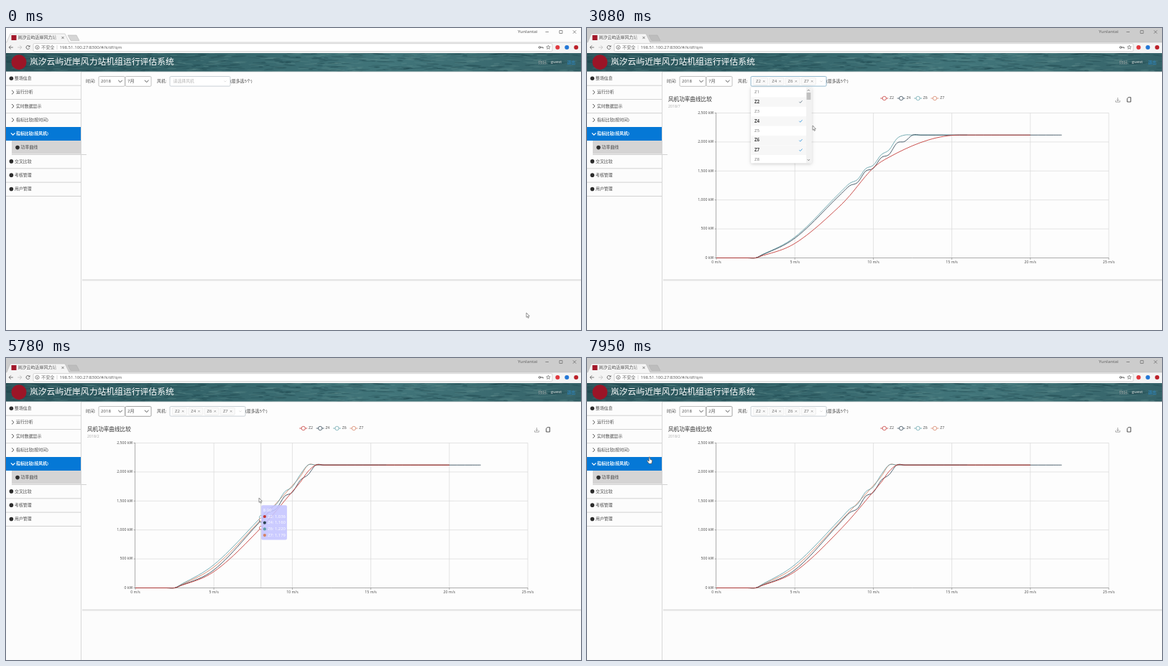
An HTML page with a canvas for the animation above (8 s loop, 800x421 px).

```html
<!DOCTYPE html>
<html lang="zh">
<head>
<meta charset="utf-8">
<title>风机功率曲线比较</title>
<style>
html, body { margin: 0; width: 100%; height: 100%; overflow: hidden; background: #fcfcfc; }
canvas { display: block; width: 800px; height: 421px; }
</style>
</head>
<body>
<canvas id="stage" width="800" height="421"></canvas>
<script>
const ctx = document.getElementById('stage').getContext('2d');
const LOOP = 8000;
const FONT = '"Open Sans", "Noto Sans CJK SC", "Noto Sans CJK", sans-serif';
const GRID = { l: 180, r: 726, t: 118.5, b: 320.5 };
const RATED = 2120, CUT_IN = 2.5;

// Each month: power in kW at 5, 8 and 10.5 m/s, then the speed of full power.
// pick: when it is chosen; last: top speed measured; dip: ripple at whole speeds.
const TURBINES = [
  { name: 'Z2', color: '#c23531', pick: 1880, last: 20, dip: 0,
    july: [250, 930, 1660, 15.5], feb: [280, 1036, 1821, 11.5] },
  { name: 'Z4', color: '#2f4554', pick: 2220, last: 22, dip: 70,
    july: [340, 1120, 1730, 12.5], feb: [310, 1160, 1856, 11.5] },
  { name: 'Z6', color: '#61a0a8', pick: 2520, last: 16, dip: 60,
    july: [360, 1160, 1780, 12], feb: [400, 1220, 1953, 11] },
  { name: 'Z7', color: '#d48265', pick: 2960, last: 20, dip: 0,
    july: [340, 1040, 1620, 12.5], feb: [360, 1179, 1920.5, 11] }
];

const OPEN = 1000, CLOSE = 3600, MONTH_OPEN = 4350, MONTH_PICK = 5030;
const DRAW_DELAY = 60, DRAW_TIME = 500;

// Pointer stops: arrival time, x, y
const STOPS = [
  [50, 724, 397], [900, 277, 74], [1880, 262, 98], [2080, 260, 124], [2520, 260, 152],
  [2960, 261, 166], [3080, 314, 136], [3600, 340, 106], [4120, 181, 75], [5030, 182, 91],
  [5780, 352, 195], [6650, 415, 190], [7200, 465, 215], [7740, 415, 195], [7930, 87, 138]
];

const clamp = (v, a = 0, b = 1) => Math.min(b, Math.max(a, v));
const lerp = (a, b, p) => a + (b - a) * p;
const easeOut = p => 1 - (1 - clamp(p)) ** 3;
const smooth = p => p * p * (3 - 2 * p);

function text(s, x, y, size, color = '#484848', align = 'left', weight = 400) {
  ctx.font = `${weight} ${size}px ${FONT}`;
  ctx.fillStyle = color;
  ctx.textAlign = align;
  ctx.textBaseline = 'middle';
  ctx.fillText(s, x, y);
}
function rect(x, y, w, h, color) {
  ctx.fillStyle = color;
  ctx.fillRect(x, y, w, h);
}
function paint(fill, stroke, width) {
  if (fill) { ctx.fillStyle = fill; ctx.fill(); }
  if (stroke) { ctx.strokeStyle = stroke; ctx.lineWidth = width; ctx.stroke(); }
}
function box(x, y, w, h, r, fill, stroke) {
  ctx.beginPath();
  ctx.roundRect(x, y, w, h, r);
  paint(fill, stroke, 0.8);
}
function disc(x, y, r, fill, stroke) {
  ctx.beginPath();
  ctx.arc(x, y, r, 0, 7);
  paint(fill, stroke, 0.75);
}
function line(points, color, width = 0.8) {
  ctx.beginPath();
  points.forEach(([x, y]) => ctx.lineTo(x, y));
  paint(null, color, width);
}
function shape(points, fill, stroke, width = 0.8) {
  ctx.beginPath();
  points.forEach(([x, y]) => ctx.lineTo(x, y));
  ctx.closePath();
  paint(fill, stroke, width);
}
const chevron = (x, y, color, s = 2.8, width = 1) =>
  line([[x - s, y - s / 2], [x, y + s / 2], [x + s, y - s / 2]], color, width);
const arrow = (x, y, s, color) => {
  line([[x - s * 2.8, y], [x + s * 2.8, y]], color);
  line([[x + s * 0.2, y - 2.6], [x + s * 2.8, y], [x + s * 0.2, y + 2.6]], color);
};
const tick = (x, y, color) =>
  line([[x - 2, y], [x - 0.6, y + 1.5], [x + 2.2, y - 1.6]], color, 0.9);
function cross(x, y, s, color) {
  line([[x - s, y - s], [x + s, y + s]], color, 0.65);
  line([[x + s, y - s], [x - s, y + s]], color, 0.65);
}

function pointerAt(t) {
  const next = STOPS.findIndex(s => s[0] > t);
  if (next < 1) return STOPS.at(next).slice(1);
  const [t0, x0, y0] = STOPS[next - 1], [t1, x1, y1] = STOPS[next];
  const p = smooth((t - t0) / (t1 - t0));
  return [lerp(x0, x1, p), lerp(y0, y1, p)];
}

// Soft water band behind the page title, painted once
const sea = document.createElement('canvas');
sea.width = 800;
sea.height = 26;
(function paintSea() {
  const c = sea.getContext('2d');
  const g = c.createLinearGradient(0, 0, 800, 8);
  ['#2a5359', '#34646a', '#41757a', '#356268'].forEach((color, i) => g.addColorStop(i / 3, color));
  c.fillStyle = g;
  c.fillRect(0, 0, 800, 26);
  let seed = 11;
  const rnd = () => (seed = seed * 16807 % 2147483647) / 2147483647;
  for (let i = 0; i < 500; i++) {
    c.fillStyle = i % 2 ? 'rgba(120,164,162,.2)' : 'rgba(14,48,56,.24)';
    c.beginPath();
    c.ellipse(rnd() * 800, rnd() * 26, 3 + rnd() * 10, 0.4 + rnd() * 0.7, rnd() * 0.2 - 0.1, 0, 7);
    c.fill();
  }
})();

function browserBar(focused) {
  rect(0, 0, 800, 20, focused ? '#cccccc' : '#fdfdfd');
  shape([[86, 10], [98, 10], [102, 17.5], [90, 17.5]], focused ? '#bdbdbd' : '#d6d6d6', '#aaa', 0.5);
  rect(0, 20, 800, 15, '#f4f4f4');
  shape([[1, 20.5], [6, 8], [82, 8], [88, 20.5]], '#f4f4f4');
  line([[0, 20], [1, 20], [6, 8], [82, 8], [88, 20], [800, 20]], '#b9b9b9', 0.6);
  rect(7.5, 10, 7, 7, '#a3182a');
  const fade = ctx.createLinearGradient(62, 0, 75, 0);
  fade.addColorStop(0, '#444');
  fade.addColorStop(1, 'rgba(68,68,68,0)');
  text('岚汐云屿近岸风力站', 16.5, 13.7, 6, fade);
  cross(79, 13.5, 1.6, '#444');
  text('Yunlantai', 712, 5.6, 6, '#777', 'left', 600);
  line([[750.5, 5.5], [755, 5.5]], '#666', 0.7);
  box(770, 3.5, 4, 4, 0, null, '#777');
  cross(791, 5.5, 2.2, '#555');

  arrow(7, 27, -1, '#555');
  arrow(19, 27, 1, '#bbb');
  ctx.beginPath();
  ctx.arc(30.5, 27, 2.5, 0.4, 5.6);
  paint(null, '#555', 0.8);
  shape([[33.4, 24], [33.4, 26.6], [30.8, 26.6]], '#555');
  box(38, 21.7, 722, 11, 1.5, '#fff', '#ccc');
  disc(43.5, 27, 2.6, null, '#666');
  line([[43.5, 26], [43.5, 28.6]], '#666');
  text('不安全', 49, 27.2, 6.2, '#666');
  line([[71, 24], [71, 30]], '#bbb', 0.6);
  text('198.51.100.27:8300/#/k/df/qm', 74.5, 27, 6.1, '#555');
  disc(742.5, 27, 1.3, null, '#333');
  line([[743.8, 27], [747.2, 27], [747.2, 28.4]], '#333');
  shape(Array.from({ length: 10 }, (_, i) => {
    const a = i * Math.PI / 5 - Math.PI / 2, r = i % 2 ? 1.3 : 2.9;
    return [754.5 + r * Math.cos(a), 27 + r * Math.sin(a)];
  }), null, '#555', 0.6);
  ['#e0383e', '#2377d6', '#bb2028'].forEach((color, i) => disc(767.4 + i * 12.9, 27, 3, color));
}

function header() {
  ctx.drawImage(sea, 0, 35);
  rect(0, 60.5, 800, 0.8, '#b8c2c4');
  disc(18, 47.7, 10.5, '#9c1527');
  text('岚汐云屿近岸风力站机组运行评估系统', 33, 48, 11.82, '#fff', 'left', 500);
  text('你好,', 740.5, 48, 5.8, '#a3a9a8');
  text('guest', 758, 47.8, 5.8, '#b9c3c3', 'left', 600);
  text('退出', 780.5, 48, 5.8, '#2a8fd8');
}

function sidebar() {
  const items = ['整场信息', '>运行分析', '>实时数据显示', '>指标比较(按时间)', '指标比较(按风机)',
    '功率曲线', '交叉比较', '考核管理', '用户管理'];
  const row = 19.28, active = 4, sub = 5;
  rect(0, 61, 104, 360, '#fcfcfc');
  items.forEach((s, i) => {
    const y = 70.5 + i * row, group = s[0] === '>';
    if (i === active) {
      rect(0, 138, 104.5, 19, '#0578d6');
      chevron(9.7, 147.8, '#fff', 2.8, 1.2);
      text(s, 14, y + 0.3, 5.9, '#fff', 'left', 600);
      return;
    }
    const indent = i === sub ? 8.6 : 0;
    if (indent) rect(8, 157, 96.5, 18.5, '#d5d4d4');
    if (i !== active - 1) rect(indent && 8, y + 9.2, 104, 0.9, '#cdcdcd');
    if (group) line([[8, y - 3], [11, y - 0.2], [8, y + 2.6]], '#444', 0.9);
    else disc(7.4 + indent, y - 0.3, 2.8, '#2d2d2d');
    text(group ? s.slice(1) : s, group ? 14 : 12 + indent, y, 5.9);
  });
  rect(104, 61, 1, 360, '#d8d8d8');
}

function panel() {
  rect(105, 61, 695, 290.5, '#fdfdfd');
  rect(106, 350.6, 694, 1, '#c8c8c8');
  rect(106, 351.6, 694, 1.2, '#eeeeee');
}

function nativeSelect(x, w, s, border) {
  box(x, 67.5, w, 13.8, 1.5, '#fff', border);
  text(s, x + 3, 74.3, 6.1);
  chevron(x + w - 6.3, 74.2, '#555');
}

function filters(t, chosen) {
  text('时间:', 111, 74.6, 5.9);
  nativeSelect(129, 36.3, '2018', '#b0b0b0');
  nativeSelect(166, 36, t < MONTH_PICK ? '7月' : '2月', t > 4050 ? '#8c8c8c' : '#b0b0b0');
  text('风机:', 210, 74.6, 5.9);

  const right = Math.max(312, 243.8 + chosen.length * 22.3);
  const open = t >= OPEN && t < CLOSE;
  box(228, 67.5, right - 228, 13.6, 1.5, '#fff', open ? '#79a9c4' : '#bcc5cb');
  if (!chosen.length) text('请选择风机', 232.5, 74.6, 5.9, '#b5b5b5');
  chosen.forEach(({ name }, i) => {
    const x = 231.5 + i * 22.3;
    box(x, 69.3, 20, 10, 1, '#fafafa', '#ececec');
    text(name, x + 3.5, 74.3, 6, '#666');
    cross(x + 14.7, 74.3, 1.2, '#888');
  });
  chevron(right - 7, 74.3, '#ccc', 1.6, 0.6);
  text('(最多选5个)', right, 74.6, 5.9);
}

function turbineList(t, chosen, [, py]) {
  if (t < OPEN || t > CLOSE + 100) return;
  ctx.save();
  ctx.globalAlpha = Math.min(clamp((t - OPEN) / 80), 1 - clamp((t - CLOSE) / 100));
  ctx.shadowColor = 'rgba(0,0,0,.2)';
  ctx.shadowBlur = 4;
  ctx.shadowOffsetY = 1;
  box(228, 82.5, 84.5, 106, 1.5, '#fff');
  ctx.shadowColor = 'transparent';
  for (let i = 0; i < 8; i++) {
    const name = 'Z' + (i + 1), y = 89.6 + i * 13.45;
    const on = chosen.some(c => c.name === name);
    const hover = t < 3000 && py > 83 && Math.abs(py + 5 - y) < 6.7;
    if (on || hover) rect(228.5, y - 6.7, 76.5, 13.4, on ? '#f7f7f7' : '#eaf7fe');
    text(name, 233, y, 6.1, on ? '#444' : '#777', 'left', on ? 700 : 400);
    if (on) tick(297.3, y - 0.2, i > 1 ? '#3d9be0' : '#6d7f8c');
    else if (hover) tick(297.3, y - 0.2, '#cfdde6');
  }
  rect(305, 83, 7, 105, '#f2f2f2');
  rect(305.5, 90, 5.8, 10, '#c1c1c1');
  chevron(308.3, 86.8, '#777', -1.5);
  chevron(308.3, 184, '#777', 1.5);
  ctx.restore();
}

function monthList(t, [, py]) {
  if (t < MONTH_OPEN || t >= MONTH_PICK) return;
  const row = 7.6, top = 82;
  const hot = py < top ? 6 : Math.floor((py - top) / row);
  box(166, top, 36, row * 12 + 1, 0, '#fff', '#999');
  for (let i = 0; i < 12; i++) {
    const y = top + 0.5 + i * row;
    if (i === hot) rect(166.4, y, 35.2, row, '#1e90ff');
    text(i + 1 + '月', 169, y + row / 2, 5.9, i === hot ? '#fff' : '#444');
  }
}

// Power at a wind speed: a Hermite curve through the readings, flat outside them
function power([low, mid, high, full], dip, v) {
  if (v <= CUT_IN) return 0;
  if (v >= full) return RATED;
  const xs = [CUT_IN, 5, 8, 10.5, full], ys = [0, low, mid, high, RATED];
  const slope = i => {
    if (i === 4) return 0;
    const a = Math.max(0, i - 1);
    return (ys[i + 1] - ys[a]) / (xs[i + 1] - xs[a]);
  };
  const i = xs.findIndex(x => x >= v) - 1;
  const h = xs[i + 1] - xs[i], u = (v - xs[i]) / h;
  const y = lerp(ys[i], ys[i + 1], smooth(u))
    + h * u * (1 - u) * ((1 - u) * slope(i) - u * slope(i + 1));
  return v > 8 && v % 1 === 0 ? y - dip : y;
}
const toX = (v, max) => GRID.l + v / max * (GRID.r - GRID.l);
const toY = p => GRID.b - p / 2500 * (GRID.b - GRID.t);

function curve({ pick, last, dip, color, july, feb }, t, max, morph) {
  const shown = clamp((t - pick - DRAW_DELAY) / DRAW_TIME);
  if (!shown) return;
  const pts = Array.from({ length: last * 2 + 1 }, (_, s) => [
    toX(s / 2, max),
    toY(lerp(power(july, dip, s / 2), power(feb, dip, s / 2), morph))
  ]);
  ctx.save();
  ctx.beginPath();
  ctx.rect(GRID.l, GRID.t, (GRID.r - GRID.l) * shown, GRID.b - GRID.t + 1);
  ctx.clip();
  ctx.beginPath();
  ctx.moveTo(...pts[0]);
  for (let k = 1; k < pts.length; k++) {
    const b = pts[k - 1], c = pts[k], a = pts[k - 2] ?? b, d = pts[k + 1] ?? c;
    ctx.bezierCurveTo(
      b[0] + (c[0] - a[0]) / 6, b[1] + (c[1] - a[1]) / 6,
      c[0] - (d[0] - b[0]) / 6, c[1] - (d[1] - b[1]) / 6, c[0], c[1]);
  }
  paint(null, color, 0.85);
  ctx.restore();
}

function legend(chosen) {
  const pitch = 23.4, start = 453 - (chosen.length * pitch - 4) / 2;
  chosen.forEach(({ name, color }, i) => {
    const x = start + i * pitch;
    line([[x, 98], [x + 11, 98]], color, 0.75);
    disc(x + 5.5, 98, 2.7, '#fff', color);
    text(name, x + 12.8, 98, 5.2);
  });
}

function axes(max) {
  const { l, r, t, b } = GRID;
  for (let k = 0; k <= 5; k++) {
    const y = toY(k * 500);
    if (k) line([[l, y], [r, y]], '#d8d8d8', 0.7);
    line([[l - 2.5, y], [l, y]], '#777', 0.6);
    text((k * 500).toLocaleString('en-US') + ' kW', 176.3, y, 5.2, '#484848', 'right');
  }
  for (let v = 0; v <= max; v += 5) {
    const x = toX(v, max);
    if (v) line([[x, t], [x, b]], '#d8d8d8', 0.7);
    line([[x, b], [x, b + 2.5]], '#777', 0.6);
    text(v + ' m/s', x, 326.7, 5.2, '#484848', 'center');
  }
  line([[l - 0.5, t], [l - 0.5, b], [r, b]], '#8a8a8a', 0.7);
}

function tools() {
  line([[738.5, 97], [738.5, 101.5]], '#888', 0.7);
  chevron(738.5, 100.8, '#888', 1.8, 0.7);
  line([[735.6, 101], [735.6, 103.2], [741.4, 103.2], [741.4, 101]], '#888', 0.7);
  shape([[751.6, 98.4], [753.2, 96.7], [756.6, 96.7], [756.6, 103], [751.6, 103]], null, '#444', 0.9);
}

function chart(t, chosen) {
  if (!chosen.length) return;
  text('风机功率曲线比较', 113, 100, 7.6, '#333', 'left', 500);
  text(t < MONTH_PICK ? '2018/7' : '2018/2', 113, 110, 5.2, '#aaa');
  legend(chosen);
  tools();
  axes(chosen.length > 1 ? 25 : 20);
  const max = lerp(20, 25, easeOut((t - TURBINES[1].pick) / 150));
  const morph = easeOut((t - MONTH_PICK) / 300);
  [...chosen].reverse().forEach(c => curve(c, t, max, morph));
}

function tooltip(t, [px, py]) {
  const { l, r, t: top, b } = GRID;
  if (t < MONTH_PICK || px < l || px > r || py < top || py > b) return;
  const speed = Math.round(((px - l) / (r - l) * 25 - 0.05) * 2) / 2;
  const x = toX(speed, 25);
  line([[x, top], [x, b]], '#bbb', 0.6);
  const rows = TURBINES.map(({ name, color, dip, feb }) => {
    const p = power(feb, dip, speed);
    disc(x, toY(p), 2.2, '#fff', color);
    return { color, label: `${name}: ${(Math.round(p * 10) / 10).toLocaleString('en-US')}` };
  });

  ctx.font = `400 5.9px ${FONT}`;
  const w = Math.max(...rows.map(row => ctx.measureText(row.label).width)) + 11;
  const [lx, ly] = pointerAt(t - 40);
  const bx = lx + 4.5, by = ly + 11;
  box(bx, by, w, 48.3, 2, 'rgba(196,196,255,.88)');
  text(speed.toFixed(2), bx + 2.6, by + 7, 5.9, '#fff');
  rows.forEach(({ color, label }, i) => {
    const y = by + 15.8 + i * 8.7;
    disc(bx + 4.7, y, 2.1, color);
    text(label, bx + 9, y, 5.9, '#fff');
  });
}

function pointer(t, [x, y]) {
  const hand = (t > 900 && t < 3000) || (t > 3980 && t < 5080) || t > 7850;
  ctx.save();
  ctx.translate(x, y);
  ctx.lineJoin = 'round';
  if (hand) {
    shape([[-0.8, 0.2], [0.6, 0.2], [0.9, 3.3], [4, 4.6], [2.9, 9.3], [-0.8, 9.3],
      [-3.5, 5.4], [-2.6, 4.7], [-0.9, 6]], '#fff', '#555');
  } else {
    shape([[0, 0], [0, 6.3], [1.4, 5.1], [2.4, 7.4], [3.4, 7], [2.5, 4.7], [4.3, 4.6]], '#fff', '#666', 0.7);
  }
  ctx.restore();
}

function draw(now) {
  const t = now % LOOP;
  const at = pointerAt(t);
  const chosen = TURBINES.filter(c => t >= c.pick);
  rect(0, 0, 800, 421, '#fcfcfc');
  panel();
  browserBar(t >= OPEN);
  header();
  sidebar();
  filters(t, chosen);
  chart(t, chosen);
  tooltip(t, at);
  turbineList(t, chosen, at);
  monthList(t, at);
  pointer(t, at);
}

const begin = performance.now();
function loop() {
  draw(performance.now() - begin);
  requestAnimationFrame(loop);
}
loop();
</script>
</body>
</html>
```
